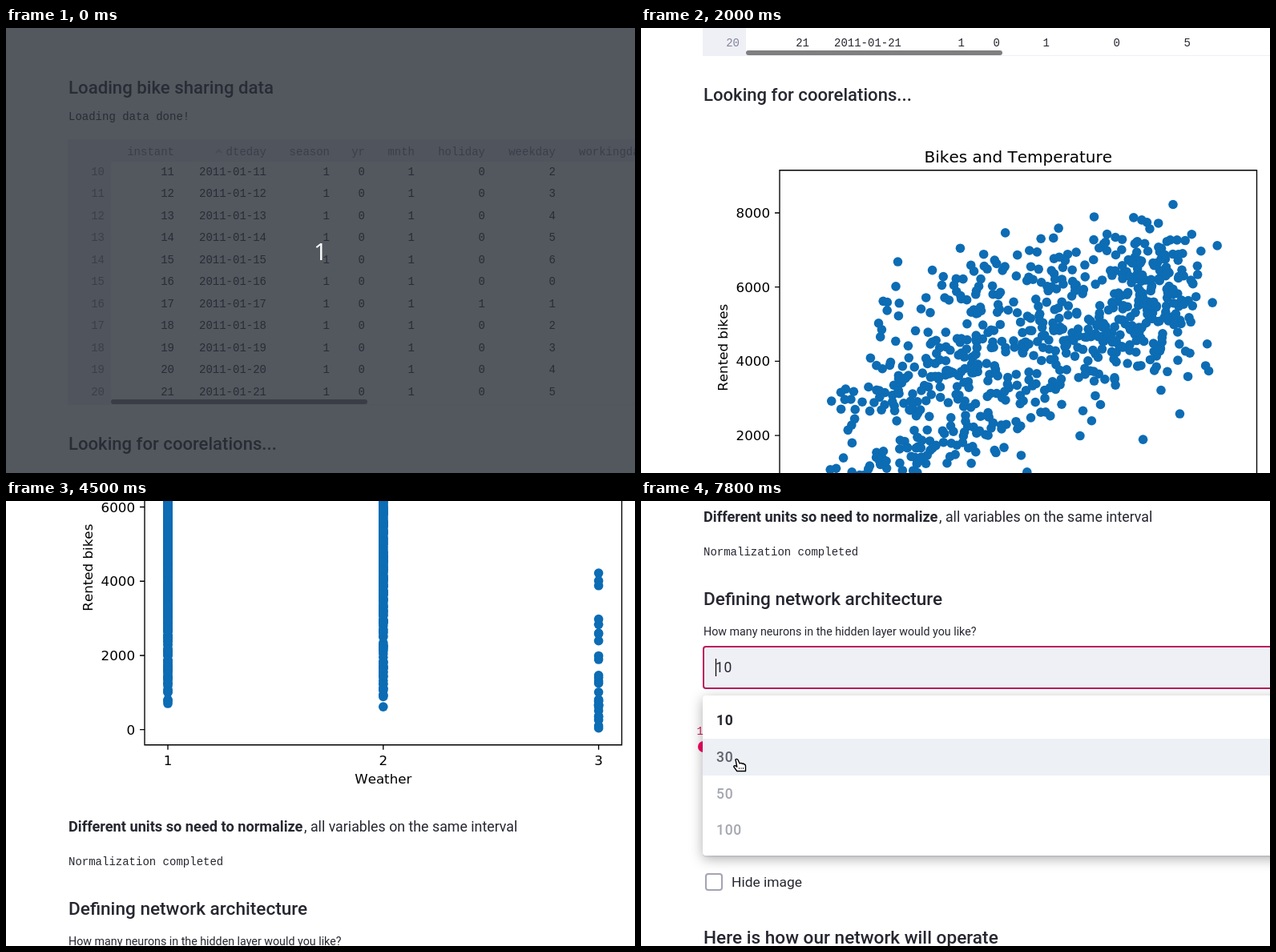
Recreate the animation shown at these times as an HTML page. Size 785x556 px, loop 8000 ms.

```html
<!DOCTYPE html>
<html lang="en">
<head>
<meta charset="utf-8">
<title>Bike sharing notebook</title>
<style>
  html, body { margin: 0; width: 100%; height: 100%; overflow: hidden; background: #fff; }
  svg { display: block; width: 785px; height: 556px; }
  text { white-space: pre; fill: #262730; font-family: Roboto, "Open Sans", sans-serif; }
  .mono { font: 14px "Liberation Mono", "DejaVu Sans Mono", monospace; }
  .head { font-weight: 500; }
  .num { font-size: 17.5px; letter-spacing: .7px; }
  .plot text { font-family: "DejaVu Sans", sans-serif; font-size: 16.7px; font-kerning: none; fill: #000; }
  .plot path { fill: none; stroke: #000; stroke-width: 1.35; }
  .dots { fill: #0c6cb4; }
  #menu { filter: drop-shadow(0 4px 8px rgba(0, 0, 0, .32)); }
</style>
</head>
<body>
<svg viewBox="0 0 785 556">
  <g id="page"></g>
  <g id="focus">
    <rect x="78" y="182" width="730" height="52" rx="3" fill="none" stroke="#bf1a5c" stroke-width="2"/>
    <path id="caret" d="M93.5 197V219" stroke="#000" stroke-width="1.2"/>
  </g>
  <g id="menu">
    <rect x="77" y="243" width="740" height="200" rx="4" fill="#fff"/>
    <rect id="hover" x="77" width="740" height="46" fill="#edf0f5"/>
  </g>
  <g id="beam" fill="none" stroke-linecap="square">
    <path d="M-2.5-7H2.5M0-7V7M-2.5 7H2.5" stroke="#000" stroke-width="3.6"/>
    <path d="M-2.5-7H2.5M0-7V7M-2.5 7H2.5" stroke="#fff" stroke-width="1.2"/>
  </g>
  <g id="hand">
    <path d="M-5-7Q-3.5-8.5-2-6.5L.2-2Q2-3.4 3.2-1.7Q4.8-2.6 5.8-.9Q7.4-1.2 7.5 1V7.5H-3.2L-7.2 2.2Q-7.2.3-5.2.8L-3.2 2.2Z"
      fill="#fff" stroke="#000" stroke-width="1.4" stroke-linejoin="round"/>
    <path d="M-.5 3V5M2 3V5M4.5 3V5" stroke="#000" stroke-width=".8"/>
  </g>
  <g id="countdown">
    <rect width="785" height="556" fill="#292d36" opacity=".8"/>
    <text x="392.5" y="289.5" text-anchor="middle" style="font:30px 'Open Sans',sans-serif;fill:#fff">1</text>
  </g>
</svg>
<script>
const LOOP = 8000, STEP = 100;
const INK = "#262730", MUTED = "#83859b", PANEL = "#eff0f6";
const $ = id => document.getElementById(id);
const page = $("page");

function add(parent, tag, attrs, content) {
  const el = document.createElementNS("http://www.w3.org/2000/svg", tag);
  for (const key in attrs) el.setAttribute(key, attrs[key]);
  if (content !== undefined) el.textContent = content;
  return parent.appendChild(el);
}
const rect = (parent, x, y, width, height, fill, more) =>
  add(parent, "rect", { x, y, width, height, fill, ...more });
const label = (parent, x, y, content, attrs) => add(parent, "text", { x, y, ...attrs }, content);
const mono = (parent, x, y, content, fill, anchor = "start") =>
  label(parent, x, y, content, { class: "mono", "text-anchor": anchor, style: `fill:${fill}` });
const heading = (parent, y, content, size) =>
  label(parent, 78, y, content, { class: "head", "font-size": size });

function buildTable() {
  rect(page, 77, 139, 708, 28, PANEL);
  rect(page, 77, 139, 54, 331, PANEL);
  rect(page, 77, 470, 708, 1, PANEL);
  const columns = { instant: 210, dteday: 325, season: 404, yr: 448, mnth: 510, holiday: 598, weekday: 686 };
  for (const name in columns) mono(page, columns[name], 158.5, name, MUTED, "end");
  mono(page, 715, 158.5, "workingday", MUTED);
  add(page, "path", { d: "M262 156L265.5 152.5L269 156", fill: "none", stroke: "#c6c7d2", "stroke-width": 2 });
  for (let i = 10; i <= 20; i++) {
    const y = 183.5 + 27.5 * (i - 10);
    const day = i + 1;
    const cells = [day, "2011-01-" + day, 1, 0, 1, day === 17 ? 1 : 0, (day + 5) % 7];
    mono(page, 123, y, i, MUTED, "end");
    Object.values(columns).forEach((x, c) => mono(page, x, y, cells[c], INK, "end"));
  }
  rect(page, 131, 464, 320, 6, "#807f80", { rx: 3 });
}

let seed = 11;
const random = () => (seed = (seed * 16807) % 2147483647) / 2147483647;
const noise = () => 2 * (random() + random() + random() - 1.5);
const season = (years, lag) => (1 - Math.cos(2 * Math.PI * (years - lag))) / 2;

// Two years of rentals: steady growth, a yearly cycle, and fewer riders in heat or bad weather.
function simulateDay(_, day) {
  const years = day / 365;
  const warmth = season(years, .05);
  const drift = noise() * (.075 - .03 * warmth);
  const temp = Math.min(.862, Math.max(.06, .23 + .49 * warmth + .02 * years + drift));
  const chance = random();
  const weather = chance < .63 ? 1 : chance < .97 ? 2 : 3;
  let bikes = 1050 + 1900 * years + 3100 * season(years, .08) ** .7;
  bikes += 2500 * drift - 4000 * Math.max(0, temp - .68);
  bikes += noise() * (250 + .05 * bikes);
  bikes *= [1, .9, .65 * random()][weather - 1];
  return { temp, weather, bikes: Math.min(8714, Math.max(22, bikes)) };
}
const days = Array.from({ length: 731 }, simulateDay);

const PLOT_W = 595.5, PLOT_H = 443.2;
const bikesY = bikes => PLOT_H * (1 - (bikes + 412) / 9561);

function buildPlot(top, title, field, ticks, toX) {
  const g = add(page, "g", { class: "plot", transform: `translate(173 ${top})` });
  const dots = add(g, "g", { class: "dots" });
  for (const day of days)
    add(dots, "circle", { cx: toX(day[field]), cy: bikesY(day.bikes), r: 5.8 });
  let frame = `M0 0H${PLOT_W}V${PLOT_H}H0Z`;
  for (let v = 0; v <= 8000; v += 2000) {
    frame += `M0 ${bikesY(v)}h-6`;
    label(g, -12, bikesY(v) + 6, v, { "text-anchor": "end" });
  }
  const centred = { "text-anchor": "middle" };
  for (const tick of ticks) {
    frame += `M${toX(tick)} ${PLOT_H}v6`;
    label(g, toX(tick), PLOT_H + 25.5, tick, centred);
  }
  add(g, "path", { d: frame });
  label(g, PLOT_W / 2, PLOT_H + 48, field === "temp" ? "Temperature" : "Weather", centred);
  label(g, PLOT_W / 2, -10, title, { ...centred, style: "font-size:20px" });
  label(g, 0, 0, "Rented bikes", { ...centred, transform: `translate(-65 ${PLOT_H / 2}) rotate(-90)` });
}

function buildForm() {
  const g = add(page, "g", { transform: "translate(0 1741)" });
  const field = (y, question, value) => {
    label(g, 78, y - 13, question, { "font-size": 14.25 });
    rect(g, 77, y, 730, 54, PANEL, { rx: 4 });
    label(g, 93, y + 33, value, { class: "num" });
  };
  label(g, 78, 26, "Different units so need to normalize", { "font-size": 18.2, "font-weight": 700 });
  label(g, 372, 26, ", all variables on the same interval", { "font-size": 17.8 });
  mono(g, 78, 67.5, "Normalization completed", INK);
  heading(g, 130, "Defining network architecture", 22.6);
  field(181, "How many neurons in the hidden layer would you like?", "10");
  label(g, 78, 273, "Choose the number of iterations", { "font-size": 14.25 });
  mono(g, 78, 291.5, "10", "#d81f5f", "middle");
  rect(g, 78, 305, 730, 4, "#e6e6ec");
  add(g, "circle", { cx: 78, cy: 307, r: 7, fill: "#f60561" });
  mono(g, 78, 333.5, "0", INK);
  field(391, "Choose the learning rate", "0.001");
  rect(g, 81, 466, 20, 20, "#fff", { rx: 3, stroke: "#a3a4b4", "stroke-width": 2 });
  label(g, 113, 482, "Hide image", { "font-size": 17.4 });
  heading(g, 553, "Here is how our network will operate", 22.6);
}

heading(page, 82, "Loading bike sharing data", 22.2);
mono(page, 78, 114.5, "Loading data done!", INK);
buildTable();
heading(page, 527, "Looking for coorelations...", 22.1);
const tenths = Array.from({ length: 9 }, (_, i) => (i + 1) / 10);
buildPlot(613.7, "Bikes and Temperature", "temp", tenths, temp => 58.4 + 664.5 * (temp - .1));
buildPlot(1215.2, "Weather and Bikes", "weather", [1, 2, 3], kind => 29 + 268.8 * (kind - 1));
buildForm();

const ROW_TOP = 251, ROW_H = 46;
const options = [10, 30, 50, 100].map((n, i) =>
  label($("menu"), 94, ROW_TOP + 29 + 45.8 * i, n, { class: "num", "font-weight": i ? 500 : 700 }));

const ease = k => k < .5 ? 4 * k ** 3 : 1 - 4 * (1 - k) ** 3;

// Each move is [start, end, ...values reached]; values rest between moves.
function follow(moves, initial, t) {
  let values = initial;
  for (const [start, end, ...goal] of moves) {
    if (t <= start) break;
    const k = ease(Math.min(1, (t - start) / (end - start)));
    values = values.map((v, i) => v + (goal[i] - v) * k);
  }
  return values;
}

const scrollMoves = [
  [1000, 1200, 116], [1400, 1800, 282], [1900, 2000, 436], [2200, 2400, 508], [2800, 3100, 758],
  [3300, 3600, 998], [3900, 4200, 1332], [4400, 4700, 1478], [5000, 5200, 1715], [5400, 5500, 1741]
];
const pointerMoves = [
  [5600, 5900, 659, 207], [6100, 6200, 656, 206], [6500, 7400, 158, 403], [7400, 7800, 123, 330]
];

const show = (id, on) => $(id).setAttribute("visibility", on ? "visible" : "hidden");

function render(time) {
  const t = Math.floor(time / STEP) * STEP;
  const [offset] = follow(scrollMoves, [0], t);
  page.setAttribute("transform", `translate(0 ${-offset})`);
  show("countdown", t < 500);

  const [x, y] = follow(pointerMoves, [667, 198], t);
  const overMenu = y > 240;
  show("beam", t >= 5500 && !overMenu);
  show("hand", t >= 5500 && overMenu);
  for (const id of ["beam", "hand"]) $(id).setAttribute("transform", `translate(${x} ${y})`);

  const open = t >= 6300;
  show("focus", open);
  show("caret", open && Math.floor((t - 6300) / 600) % 2 === 0);
  show("menu", open);
  $("menu").setAttribute("opacity", t < 6400 ? .5 : 1);
  const row = Math.min(3, Math.max(0, Math.floor((y - 6 - ROW_TOP) / ROW_H)));
  $("hover").setAttribute("y", ROW_TOP + ROW_H * row);
  options.forEach((el, i) => el.style.fill = i === 0 ? INK : i === row ? "#60626c" : "#a5a7b1");
}

let origin;
function tick(now) {
  origin ??= now;
  render((now - origin) % LOOP);
  requestAnimationFrame(tick);
}
render(0);
requestAnimationFrame(tick);
</script>
</body>
</html>
```
